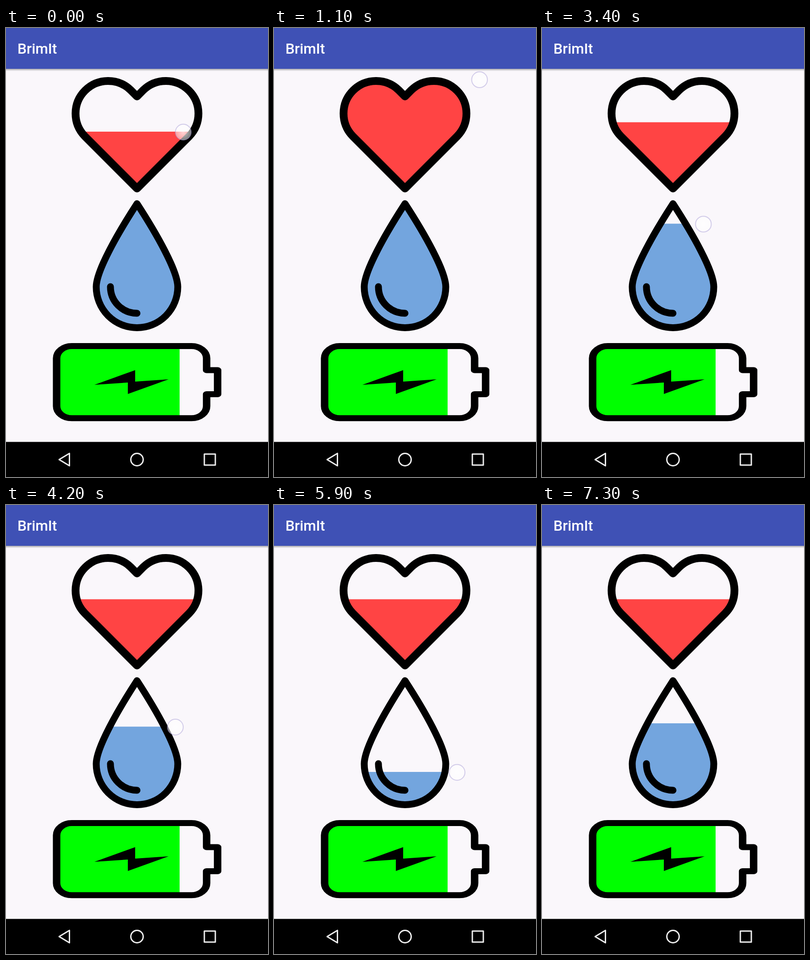
An HTML page that plays this animation: 572x979 px, repeating every 8000 ms.

```html
<!DOCTYPE html>
<html lang="en">
<head>
<meta charset="utf-8">
<title>Fill levels</title>
<style>
  html, body { margin: 0; width: 100%; height: 100%; overflow: hidden; background: #faf7fb; }
  svg { display: block; width: 100%; height: 100%; }
  .title { font: 500 31.7px Roboto, sans-serif; fill: #fff; }
  .line { fill: none; stroke: #000; stroke-linecap: round; stroke-linejoin: round; }
  .nav { fill: none; stroke: #ececec; stroke-width: 3; stroke-linejoin: round; }
</style>
</head>
<body>
<svg viewBox="0 0 572 979">
  <defs>
    <!-- Each lobe is a half circle on a 45 degree chord. -->
    <path id="heart" d="M286 350 L172 236 A71 71 0 0 1 272.4 135.6 L286 149.2 L299.6 135.6 A71 71 0 0 1 400 236 Z"/>
    <path id="drop" d="M286 383 C243 449 197 530 197 564.5 A89 89 0 0 0 375 564.5 C375 530 329 449 286 383 Z"/>
    <path id="battery" transform="scale(1 .8)" d="M143.5 867 H405 a33 33 0 0 1 33 33 V932.5 h24 V998 h-24 V1030.5 a33 33 0 0 1 -33 33 H143.5 a33 33 0 0 1 -33 -33 V900 a33 33 0 0 1 33 -33 Z"/>
    <clipPath id="inHeart"><use href="#heart"/></clipPath>
    <clipPath id="inDrop"><use href="#drop"/></clipPath>
    <clipPath id="inBattery"><use href="#battery"/></clipPath>
    <linearGradient id="shade" x2="0" y2="1">
      <stop stop-color="#000" stop-opacity=".32"/>
      <stop offset="1" stop-color="#000" stop-opacity="0"/>
    </linearGradient>
    <radialGradient id="glow">
      <stop stop-color="#fff" stop-opacity=".78"/>
      <stop offset="1" stop-color="#fff" stop-opacity=".5"/>
    </radialGradient>
  </defs>

  <rect width="572" height="979" fill="#faf7fb"/>
  <rect y="89" width="572" height="5" fill="url(#shade)"/>
  <rect width="572" height="89" fill="#3f51b5"/>
  <text class="title" x="25" y="56">BrimIt</text>

  <g clip-path="url(#inHeart)"><rect id="red" x="140" width="292" height="280" fill="#ff4444"/></g>
  <use href="#heart" class="line" stroke-width="17"/>

  <g clip-path="url(#inDrop)"><rect id="blue" x="186" width="200" height="300" fill="#73a5de"/></g>
  <use href="#drop" class="line" stroke-width="15"/>
  <path class="line" stroke-width="15" d="M228 564 a58 58 0 0 0 58 58"/>

  <g clip-path="url(#inBattery)"><rect x="102" y="687" width="277" height="170" fill="#0f0"/></g>
  <use href="#battery" class="line" stroke-width="16.3"/>
  <path d="M193 778 L282 746 V771 L355 766 L266 798 V773 Z"/>

  <rect y="902.5" width="572" height="77"/>
  <path class="nav" d="M116 941 L138.5 927.5 V954.5 Z"/>
  <circle class="nav" cx="286" cy="941" r="13.5"/>
  <rect class="nav" x="433" y="929" width="24" height="24"/>

  <circle id="touch" r="17.2" fill="url(#glow)" stroke="#aaa0d8" stroke-opacity=".5" stroke-width="2"/>
</svg>
<script>
  const LOOP = 8000, STEP = 100;
  const FULL = 370;

  // Finger turning points; legs are steady, the last one eases in and out.
  const heartDrag = [
    { t: 0, x: 387, y: 227 },
    { t: 1300, x: 460, y: 92 },
    { t: 2100, x: 453, y: 206.5 }
  ];
  const dropDrag = [
    { t: 3200, x: 348, y: 413.5 },
    { t: 5200, x: 391.5, y: 555 },
    { t: 6100, x: 402, y: 591 },
    { t: 7200, x: 419.5, y: 477 }
  ];

  const byId = id => document.getElementById(id);
  const red = byId('red'), blue = byId('blue'), touch = byId('touch');
  const mix = (a, b, k) => a + (b - a) * k;
  const ease = k => (1 - Math.cos(Math.PI * k)) / 2;

  function fingerAt(drag, t) {
    const last = drag[drag.length - 1];
    if (t >= last.t) return last;
    const i = Math.max(1, drag.findIndex(point => point.t > t));
    const from = drag[i - 1], to = drag[i];
    const part = (t - from.t) / (to.t - from.t);
    const k = to === last ? ease(part) : part;
    return { x: mix(from.x, to.x, k), y: mix(from.y, to.y, k) };
  }

  function draw(t) {
    const dropTouched = t >= dropDrag[0].t;
    const drag = dropTouched ? dropDrag : heartDrag;
    const { x, y } = fingerAt(drag, t);

    red.setAttribute('y', fingerAt(heartDrag, t).y - 1);
    blue.setAttribute('y', dropTouched ? y - 1 : FULL);
    touch.setAttribute('cx', x);
    touch.setAttribute('cy', y);
    touch.setAttribute('visibility', t <= drag[drag.length - 1].t ? 'visible' : 'hidden');
  }

  let start;
  function tick(now) {
    start ??= now;
    draw(Math.floor(((now - start) % LOOP) / STEP) * STEP);
    requestAnimationFrame(tick);
  }
  draw(0);
  requestAnimationFrame(tick);
</script>
</body>
</html>
```
